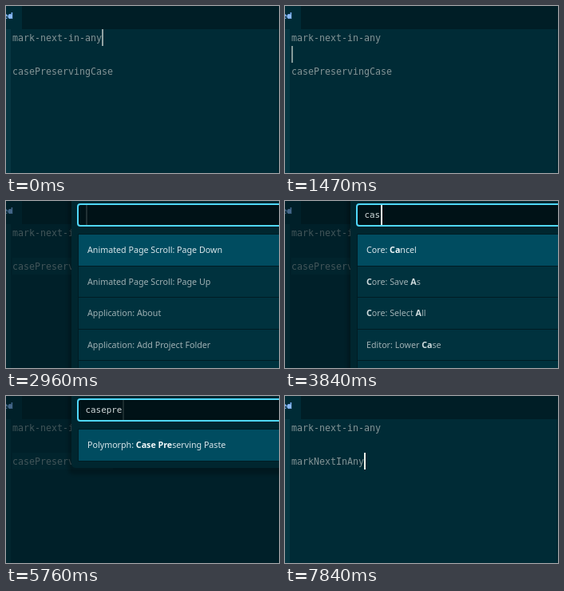
Write an HTML page that moves like this. It is 342 by 209 pixels and loops after 7.94 s.

```html
<!DOCTYPE html>
<html lang="en">
<head>
<meta charset="utf-8">
<title>Case preserving paste</title>
<style>
  html, body { margin: 0; width: 100%; height: 100%; overflow: hidden; background: #002b36; }
  svg { display: block; width: 342px; height: 209px; }
  text { white-space: pre; }
  .code { font: 11.63px "DejaVu Sans Mono", monospace; fill: #839496; }
  .query { font: 10.9px "DejaVu Sans Mono", monospace; fill: #d3dcdd; }
  .ui { font: 10.7px "Noto Sans", sans-serif; }
  .tab { fill: #7fb2f5; font-weight: 600; }
  .row { fill: #00323e; }
  .row.on { fill: #004c60; }
  .label { fill: #a0b1b4; }
  .label.on { fill: #d9e6ea; }
  .label tspan { font-weight: 700; fill: #d3dfe1; }
  .label.on tspan { fill: #f4fafb; }
</style>
</head>
<body>
<svg viewBox="0 0 342 209">
  <defs>
    <filter id="soft" x="-20%" y="-20%" width="140%" height="140%">
      <feGaussianBlur stdDeviation="2.5"/>
    </filter>
  </defs>

  <rect width="342" height="209" fill="#002b36"/>
  <rect width="342" height="29" fill="#001e26"/>
  <rect width="20" height="29" fill="#002b36"/>
  <rect y="29" width="6" height="180" fill="#073642"/>
  <rect x="340" y="29" width="2" height="180" fill="#002630"/>
  <text class="ui tab" x="9" y="16" text-anchor="end">ed</text>
  <circle cx="5.2" cy="13" r="2.8" fill="#8ab8f5"/>

  <rect id="selection" x="8" y="71" width="126" height="21" fill="#03323e"/>
  <text class="code" x="8" y="44">mark-next-in-any</text>
  <text class="code" x="8" y="86" id="target"></text>
  <rect id="caret" width="2" height="21" fill="#f3f4ec"/>

  <g id="palette">
    <rect width="342" height="209" fill="#00171d" fill-opacity=".5"/>
    <rect id="shadow" x="78" y="-20" width="300" rx="6" fill="#000" fill-opacity=".25" filter="url(#soft)"/>
    <rect id="panel" x="82" y="-20" width="300" rx="5" fill="#00262f"/>
    <rect x="90" y="4" width="280" height="27" rx="3" fill="#001217" stroke="#50d8fb" stroke-width="2"/>
    <text class="query" x="99.5" y="21" id="query"></text>
    <rect id="inputCaret" y="5" width="2" height="25" fill="#f3f4ec"/>
    <rect id="frame" x="90" y="41" width="290" fill="#001c24"/>
    <g id="rows"></g>
  </g>
</svg>

<script>
const LOOP = 7940, STEP = 147.9, ROW = 39.5, TOP = 42;
const $ = id => document.getElementById(id);

// Asterisks mark the matched letters.
const lists = {
  all: ["Animated Page Scroll: Page Down", "Animated Page Scroll: Page Up",
        "Application: About", "Application: Add Project Folder"],
  c: ["*C*ore: Cut", "*C*ore: Copy", "*C*ore: Close", "*C*ore: Cancel"],
  ca: ["Core: *Ca*ncel", "*C*ore: Save *A*s", "*C*ore: Select *A*ll", "Editor: Lower *Ca*se"],
  cas: ["Editor: Lower *Cas*e", "Editor: Upper *Cas*e",
        "Polymorph: *Cas*e Preserving Paste", "Tree View: *C*oll*a*p*s*e All"],
  case: ["Editor: Lower *Case*", "Editor: Upper *Case*",
         "Polymorph: *Case* Preserving Paste", "Tree View: *C*oll*a*p*se* All"],
  casep: ["Polymorph: *Case P*reserving Paste", "*A*tom Hot Package Loader: *Se*lect *P*ackage",
          "Notifi*ca*tion*s*: Toggl*e* Dev *P*anel"],
  casepre: ["Polymorph: *Case Pre*serving Paste"]
};

// step, typed text, list shown, time the blinking starts
const inputs = [
  [17, "", "all", 2510], [24, "c", "all"], [25, "ca", "c"], [26, "cas", "ca"],
  [27, "cas", "cas"], [30, "case", "cas"], [31, "case", "case"],
  [33, "casepr", "casep"], [34, "casepre", "casepre", 5400]
];

// step, column, line, time the blinking starts, opacity while it is solid
const carets = [
  [0, 16, 0, 370, 0.6], [1, 16, 0, 370], [10, 0, 1, LOOP, 0.55],
  [11, 16, 2], [12, 18, 2], [14, 0, 2], [42, 13, 2, 6200]
];

const OPEN = 17, CLOSE = 42, SELECT = 14;

const latest = (table, step) => table.filter(e => e[0] <= step).pop();
const show = (el, on) => el.setAttribute("display", on ? "inline" : "none");
const blink = (t, start = LOOP, solid = 1) =>
  t < start ? solid : 0.55 + 0.45 * Math.cos((t - start) / 400 * Math.PI);
const rowTop = i => Math.round(TOP + i * ROW);

function drawList(items) {
  const full = items.length > 3;
  const count = full ? 5 : items.length;
  let html = "";
  for (let i = 0; i < count; i++) {
    const y = rowTop(i), on = i ? "" : " on";
    const label = (items[i] || "").replace(/\*(.+?)\*/g, "<tspan>$1</tspan>");
    html += `<rect class="row${on}" x="91" y="${y}" width="280" height="${rowTop(i + 1) - y - 1}"/>` +
            `<text class="ui label${on}" x="102" y="${y + 23}">${label}</text>`;
  }
  $("rows").innerHTML = html;
  const end = rowTop(count);
  $("frame").setAttribute("height", end - 41);
  $("panel").setAttribute("height", end + 28);
  $("shadow").setAttribute("height", end + 36);
}

function draw(step) {
  const t = step * STEP;
  const open = step >= OPEN && step < CLOSE;

  show($("selection"), step >= SELECT && step < CLOSE);
  $("target").textContent = step < CLOSE ? "casePreservingCase" : "markNextInAny";

  const [, col, line, start, solid] = latest(carets, step);
  const caret = $("caret");
  show(caret, !open);
  caret.setAttribute("x", 8 + col * 7);
  caret.setAttribute("y", 29 + line * 21);
  caret.setAttribute("opacity", blink(t, start, solid));

  show($("palette"), open);
  if (!open) return;
  const [, typed, list, from] = latest(inputs, step);
  $("query").textContent = typed;
  $("inputCaret").setAttribute("x", Math.round(100.2 + typed.length * 6.5));
  $("inputCaret").setAttribute("opacity", blink(t, from));
  drawList(lists[list]);
}

let shown = -1;
function tick() {
  const step = Math.floor((performance.now() % LOOP + 12) / STEP);
  if (step !== shown) draw(shown = step);
  requestAnimationFrame(tick);
}
tick();
</script>
</body>
</html>
```
